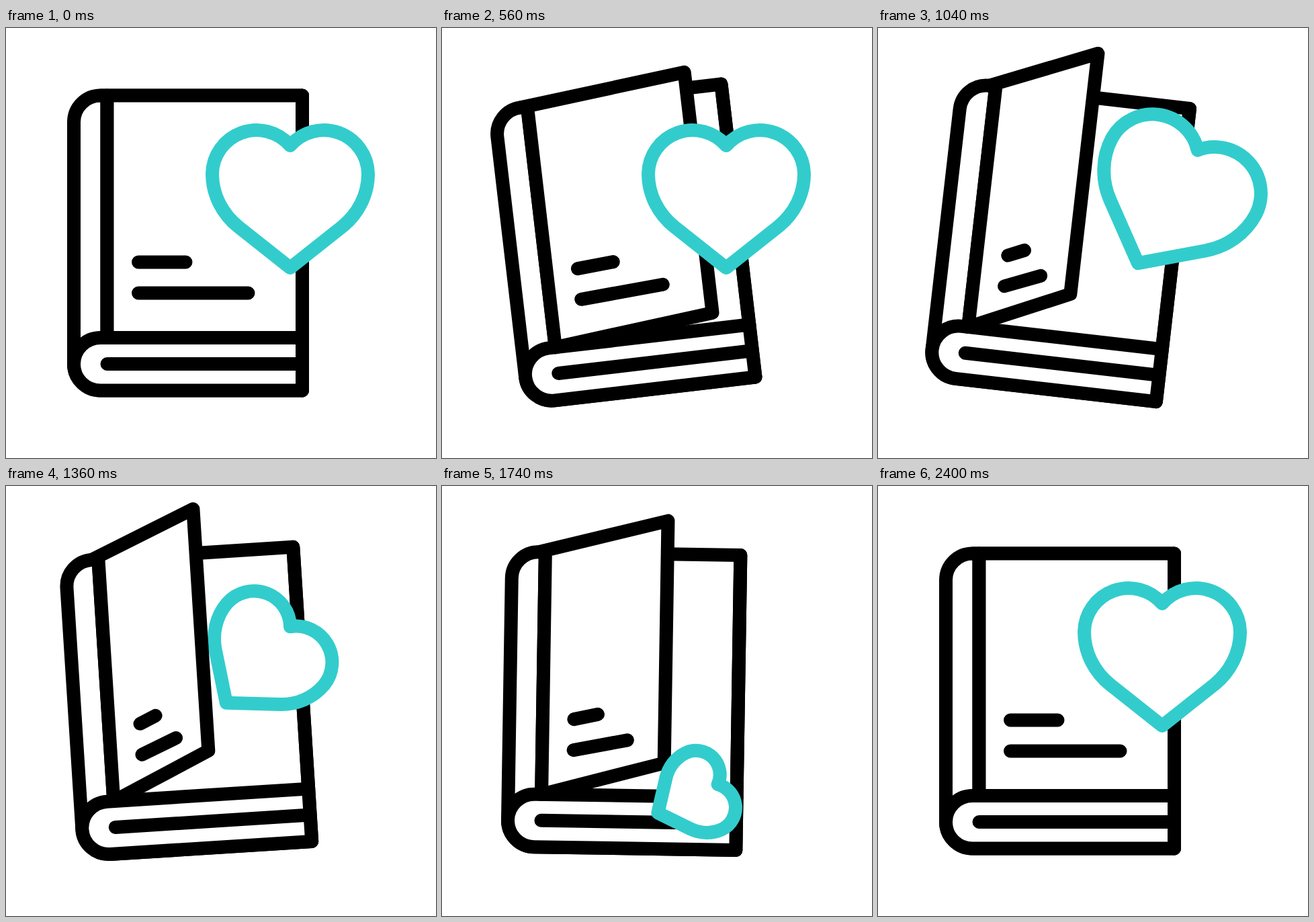
An HTML page for the animation above (3600 ms loop, 640 px wide and 640 px high).

```html
<!DOCTYPE html>
<html lang="en">
<head>
<meta charset="utf-8">
<title>Book and heart</title>
<style>
  html, body { margin: 0; width: 100%; height: 100%; overflow: hidden; background: #fff; }
  svg { display: block; width: 100vw; height: 100vh; }
  path { fill: none; stroke: #000; stroke-width: 20; stroke-linecap: round; stroke-linejoin: round; }
  .paper { fill: #fff; }
  #heart { fill: #fff; stroke: #33cccc; }
</style>
</head>
<body>
<svg id="stage" viewBox="0 0 640 640">
  <g id="back">
    <path class="paper" d="M441 100.5H140.5A39.5 39.5 0 0 0 101 140V500A39.5 39.5 0 0 0 140.5 539.5H441Z"/>
    <path class="paper" d="M441 461H140.5A39.5 39.25 0 0 0 140.5 539.5H441"/>
    <path d="M150.5 500H441M150.5 100.5V461M441 100.5V539.5"/>
  </g>
  <g id="front">
    <path id="cover" class="paper"/>
    <path id="lines"/>
  </g>
  <path id="heart" d="M423 175A66 66 0 0 0 307 217C307 248 322 277 346 296L423 357L500 296C524 277 539 248 539 217A66 66 0 0 0 423 175Z"/>
</svg>
<script>
const LOOP = 3600;
const el = id => document.getElementById(id);
const [stage, back, front, cover, lines, heart] =
  ['stage', 'back', 'front', 'cover', 'lines', 'heart'].map(el);

// Smooth step from 0 to 1 between two times.
function ease(t, start, end) {
  const u = Math.min(1, Math.max(0, (t - start) / (end - start)));
  return u * u * (3 - 2 * u);
}

// One lunge to the left, then shrinking swings until the book stands still.
function tiltAt(t) {
  const settle = 800, beat = 266, swings = 3;
  let from = -15;
  let tilt = from * ease(t, 355, settle);
  for (let i = 0; i <= swings; i++) {
    const to = i < swings ? 7.1 * (-0.54) ** i : 0;
    const start = settle + beat * i;
    tilt += (to - from) * ease(t, start, start + beat);
    from = to;
  }
  return tilt;
}

function drawBook(t) {
  const spin = `rotate(${tiltAt(t)} 282 311)`;
  back.setAttribute('transform', spin);
  front.setAttribute('transform', spin);

  const open = ease(t, 370, 840) - ease(t, 1545, 2145);
  const edge = 441 - 145 * open, top = 100.5 - 66 * open;
  cover.setAttribute('d', `M140.5 100.5L${edge} ${top}v360.5L150.5 461V100.5`);

  const line = (y, width, shrink, rise) =>
    `M197 ${y}l${width - shrink * open} ${-rise * open}`;
  lines.setAttribute('d', line(348.5, 70.5, 46.8, 10.5) + line(394.5, 163.5, 111.5, 21.5));
}

// The heart leans out, dives behind the cover, drops and flies home.
function drawHeart(t) {
  const x = 423 + 24 * ease(t, 950, 1180) - 96 * ease(t, 1170, 1455) + 72 * ease(t, 1600, 2080);
  const y = 266 + 222 * (ease(t, 1360, 1640) - ease(t, 1640, 2150));
  const turn = 28 * ease(t, 600, 1060) + 44 * ease(t, 1215, 1640) - 72 * ease(t, 1640, 2150);
  const scale = 1 + 0.045 * ease(t, 600, 1040) - 0.505 * ease(t, 1040, 1720) + 0.46 * ease(t, 1720, 2170);

  heart.setAttribute('transform',
    `translate(${x} ${y}) rotate(${turn}) scale(${scale}) translate(-423 -266)`);
  heart.style.strokeWidth = 20 / scale;
  stage.insertBefore(heart, t > 1150 && t < 1680 ? front : null);
}

function draw(now) {
  const t = now % LOOP;
  drawBook(t);
  drawHeart(t);
  requestAnimationFrame(draw);
}
draw(performance.now());
</script>
</body>
</html>
```
